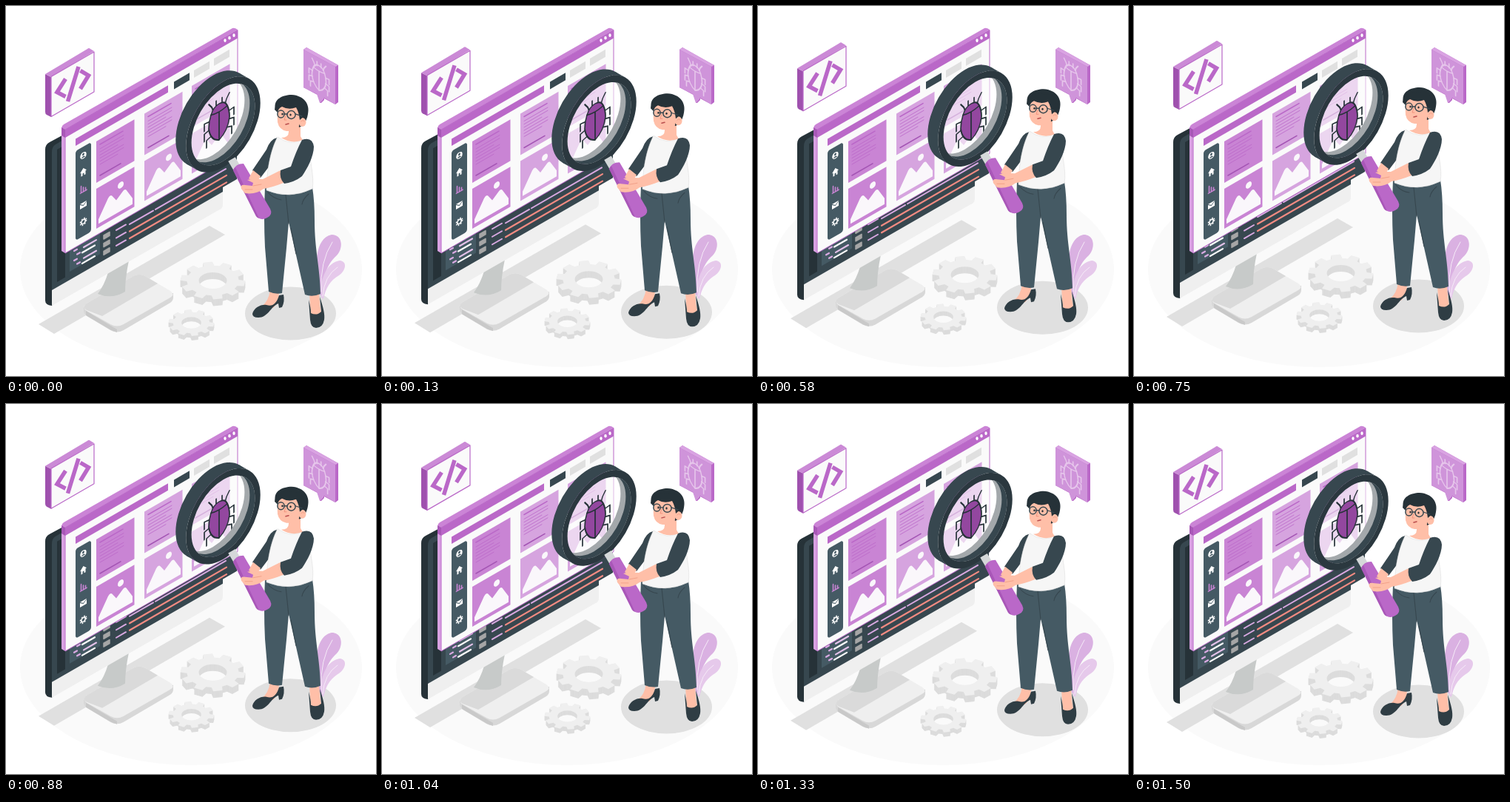
Animation, 500 px wide and 500 px high, one loop 1.54 s. Source, as an HTML page:

```html
<!DOCTYPE html>
<html lang="en">
<head>
<meta charset="utf-8">
<title>Bug hunt</title>
<style>
html, body { margin: 0; width: 100%; height: 100%; overflow: hidden; background: #fff; }
svg { display: block; width: 100%; height: 100%; }
</style>
</head>
<body>
<svg id="stage" viewBox="0 0 500 500"></svg>
<script>
const PURPLE = '#ba68c8', LILAC = '#c984d4', PALE = '#d6a4df', INK = '#263238', SLATE = '#37474f', TEAL = '#455a64', SKIN = '#ffbfa8';
const SLOPE = 0.5774;

const path = (d, fill, more = '') => `<path d="${d}" fill="${fill}" ${more}/>`;
const stroke = (d, color, width = 1, more = '') =>
  path(d, 'none', `stroke="${color}" stroke-width="${width}" stroke-linecap="round" stroke-linejoin="round" ${more}`);
const ellipse = (cx, cy, rx, ry, fill, more = '') =>
  `<ellipse cx="${cx}" cy="${cy}" rx="${rx}" ry="${ry}" fill="${fill}" ${more}/>`;

// Isometric helpers: a panel, a line, a skewed group and a circle
const panel = (x, y, w, h, fill, more) => path(`M${x} ${y}l${w} ${-w * SLOPE}v${h}l${-w} ${w * SLOPE}z`, fill, more);
const line = (x, y, w, color, width) => stroke(`M${x} ${y}l${w} ${-w * SLOPE}`, color, width);
const skew = (x, y, content, slope = -SLOPE, size = 1) =>
  `<g transform="matrix(1 ${slope} 0 1 ${x} ${y}) scale(${size})">${content}</g>`;
const ring = (cx, cy, r) => {
  const dx = 0.612 * r, dy = -1.061 * r, arc = `${1.2247 * r} ${0.7071 * r} -60 0 1`;
  return `M${cx - dx} ${cy - dy}a${arc} ${2 * dx} ${2 * dy}a${arc} ${-2 * dx} ${-2 * dy}z`;
};

function gear(cx, cy, r, teeth, height) {
  const points = [], step = 2 * Math.PI / teeth;
  for (let i = 0; i < teeth; i++)
    for (const [offset, scale] of [[-0.33, 0.8], [-0.23, 1], [0.23, 1], [0.33, 0.8]]) {
      const a = (i + offset + 0.25) * step;
      points.push(`${cx + r * scale * Math.cos(a)} ${cy + r * scale * Math.sin(a) * SLOPE}`);
    }
  const h = r * 0.43, v = h * SLOPE;
  const d = `M${points.join('L')}zM${cx - h} ${cy}a${h} ${v} 0 0 1 ${2 * h} 0a${h} ${v} 0 0 1 ${-2 * h} 0z`;
  let out = '';
  for (let z = height; z >= 0; z--)
    out += path(d, z ? '#dcdcdc' : '#efefef', `fill-rule="evenodd" transform="translate(0 ${z})"`);
  return out;
}

function monitor() {
  let s = path('M53 194Q53 187 59 184L85 170V380L62 405Q53 404 53 398z', INK)
    + path('M62 197Q62 190 67 187L293 57V252L62 385z', SLATE)
    + panel(69, 194, 224, 179, INK)
    + path('M62 384L293 251V268Q293 274 287 276L62 405z', '#efefef')
    + panel(80, 240, 232, 128, SLATE)
    + panel(86, 300, 41, 59, TEAL);
  for (let i = 0; i < 3; i++)
    s += panel(132, 310 + i * 10.7, 8, 5, '#a6a6a6', 'stroke="#a6a6a6" stroke-width="1.5" stroke-linejoin="round"')
      + line(149, 303 + i * 10.5, 13, '#d9a9e2', 2);
  for (let i = 0; i < 4; i++)
    s += line(92 + i % 2 * 4, 331 + i * 6.5 - i % 2 * 2, 4, '#d9a9e2', 2.2)
      + line(105 - i % 2 * 2, 326 + i * 7.3, 17, i % 2 ? '#fff' : '#e3c1e9', 2.2);
  return s + line(167, 295, 32, '#d9a9e2', 2) + line(202, 275, 95, '#d9a9e2', 2)
    + line(167, 304.5, 131, '#f28b82', 2.2) + line(167, 314, 131, '#f28b82', 2.2);
}

const stand = () =>
  path('M105 407V413Q106 417 111 420L141 438Q150 443 159 438L222 401Q226 398 226 394V388z', '#d8d8d8')
  + path('M109 402L172 365Q180 361 188 365L222 385Q229 390 222 394L159 430Q150 435 141 430L109 412Q102 407 109 402z', '#efefef')
  + path('M109 402L172 365Q180 361 188 365L205 375L130 419L109 411Q102 407 109 402z', '#dadada')
  + path('M138 360L166 344Q161 368 161 386Q143 397 124 389Q133 377 138 360z', '#c7cac9')
  + path('M108 412L150 437V441L142 438L108 418z', '#c9c9c9');

const badge = () =>
  path('M53 92L61 96V150L55 147Q53 146 53 143z', '#9f51ae')
  + path('M53 92L110 58Q112 56 114 58L119 61L61 96z', '#cb8ad6')
  + panel(61, 95.5, 58, 54, '#fafafa', `stroke="${PURPLE}" stroke-width="1.2" stroke-linejoin="round"`)
  + path('M80.500 98.500L69 116.500L80.500 122.500M100.500 87.500L111.500 94L100.500 112M98 82L83.500 129', 'none',
    `stroke="${PURPLE}" stroke-width="5.5" stroke-miterlimit="8"`);

const picture = (x, y, fill) => panel(x, y, 51.5, 54, fill)
  + skew(x, y, path('M3 49V43L16 22Q19 18 22 23L27 31L36 24Q39 22 41 26L49 41V49z', '#faf7fb') + ellipse(33, 14, 4, 4.3, '#faf7fb'));

function article(x, y, fill) {
  let s = panel(x, y, 51.5, 56, fill) + line(x + 5, y + 4, 31, PURPLE, 1.6);
  for (let i = 0; i < 6; i++) s += line(x + 5, y + 10 + i * 4.2, i % 3 == 2 ? 24 : 32, PURPLE, 0.8);
  return s + line(x + 5, y + 46, 28, '#a455b4', 1.5);
}

function browser() {
  const icons =
    ellipse(10.5, 15, 4.2, 4.4, '#fff') + ellipse(10.5, 13.5, 1.5, 1.6, TEAL) + path('M7.700 18Q10.500 13.500 13.300 18z', TEAL)
    + path('M10.500 32L15 37H13.500V42H11.500V39H9.500V42H7.500V37H6z', '#fff')
    + stroke('M7.500 55V63M10.500 58V63M13.500 60V63M6.500 64H15', LILAC, 1.6)
    + path('M6 78.500H15V85.500H6z', '#fff') + stroke('M6 79L10.500 82.500L15 79', TEAL, 0.9)
    + ellipse(10.5, 104.5, 2.7, 2.8, 'none', 'stroke="#fff" stroke-width="1.6"')
    + ellipse(10.5, 104.5, 4.2, 4.4, 'none', 'stroke="#fff" stroke-width="1.4" stroke-dasharray="1.7 1.7"');
  return path('M75 165Q75 162 78 160L306 30Q309 29 313 32L80 168z', '#cb84d6')
    + path('M75 164L80 167V334L75 331z', '#d8a0e1')
    + panel(80, 167, 233, 167, '#fafafa', `stroke="${PURPLE}"`)
    + panel(80, 167, 233, 11, PURPLE) + path('M75 164L80 167V178L75 175z', '#a858b7')
    + [296, 302, 308].map(x => ellipse(x, 217.5 - x * SLOPE, 1.7, 2.3, '#fff')).join('')
    + panel(94, 179.5, 125, 9.5, PURPLE)
    + panel(227, 102.5, 21, 10, SLATE) + panel(254, 87, 21, 10, '#e0e0e0') + panel(281, 71, 21, 10, '#e0e0e0')
    + skew(94, 196, `<rect width="21" height="121" rx="3.500" fill="${TEAL}"/>`) + skew(94, 193, icons)
    + article(122, 183, LILAC) + article(187, 145.5, PALE) + article(251, 108, PALE)
    + picture(122, 247, LILAC) + picture(187, 209.5, PALE) + picture(251, 172.5, PALE);
}

// A symmetric beetle around the origin, seen flat from above
function beetle(color, width, fill) {
  const half = stroke('M13 -7L20 -8V2M13 4L20 6V16M11 14L17 16V26M8 -19L10 -25L14 -31M4 -22V-30', color, width);
  return half + `<g transform="scale(-1 1)">${half}</g>`
    + path('M0 -24Q8 -24 11 -15Q14 -8 14 2Q12 19 0 25Q-12 19 -14 2Q-14 -8 -11 -15Q-8 -24 0 -24z', fill, `stroke="${color}" stroke-width="${width}"`)
    + stroke('M-11 -15Q0 -11 11 -15M0 -13V25', color, width);
}

const bubble = () =>
  path('M402 59L406 56L449 80V130L445 133L402 110z', PURPLE)
  + path('M402 59L406 56L449 80L445 82z', '#d9a3e2')
  + path('M402 59L445 82V133L430 124L424 131L420 119L402 110z', '#cf94da')
  + path('M424 131L430 124V127L426 131z', PURPLE)
  + skew(423, 97, beetle('#e6c6eb', 2.4, 'none'), SLOPE, 0.68);

const plant = () =>
  path('M424 390C416 352 417 314 440 309C456 309 456 329 446 338C436 347 428 362 427 392z', '#dab1e2')
  + path('M426 394C424 366 434 347 451 344C462 345 459 358 450 364C438 371 432 381 429 396z', '#e6c9eb')
  + stroke('M426 386Q424 345 441 319M428 392Q430 365 448 353', '#f6ebf8', 1);

const CX = 293.5, CY = 160;
const glass = () => path(ring(CX - 6, CY - 3, 48), '#fff', 'opacity=".55"');

function magnifier() {
  const outer = ring(CX, CY, 58), inner = ring(CX, CY, 49.5), all = 'M200 50H400V260H200z';
  const opening = ring(CX - 14, CY - 8, 49.5), odd = 'fill-rule="evenodd"';
  return `<clipPath id="rim">${path(inner, '#000')}</clipPath>`
    + `<clipPath id="back"><path clip-rule="evenodd" d="${all}${outer}"/></clipPath>`
    + `<g clip-path="url(#back)">${path(ring(CX - 14, CY - 8, 58), SLATE)}`
    + path(`M${CX - 35.5} ${CY + 61.5}l-14 -8L${CX + 21.5} ${CY - 69.5}l14 8z`, SLATE) + '</g>'
    + `<g clip-path="url(#rim)">${path(all + opening, '#a3a8ab', odd)}${path(all + ring(CX - 7, CY - 4, 49.5), SLATE, odd)}</g>`
    + path(outer + inner, '#2b383f', odd)
    + stroke('M305 207L315 224', '#d5d8d9', 11, 'style="stroke-linecap:butt"')
    + path('M307 222Q310 213 321 213L357 274Q361 282 353 286Q345 291 338 284z', PURPLE)
    + path('M307 222Q308 219 310 218L342 287Q339 286 338 284z', '#a957b8');
}

const legs = () =>
  path('M357 383L369 386Q369 401 361 408L345 406Q355 400 357 383zM410 388L423 386Q424 408 427 418L412 419z', SKIN)
  + path('M333 416C335 408 344 403 352 404Q364 408 369 391L375 390Q377 399 373 407L369 408L368 402C357 407 354 421 341 421Q333 421 333 416z', '#2f3d44')
  + path('M409 397Q412 408 412 415Q420 419 426 413L424 393C429 408 431 417 430 424Q428 435 419 435Q412 435 411 424z', '#2f3d44')
  + path('M350 246Q348 285 350 326L355 386Q364 390 373 388L379 327L382 292L404 390Q414 394 425 389C424 350 417 330 417 290Q417 264 414 245z', TEAL)
  + stroke('M378 255Q380 275 382 294M409 254Q401 261 400 268M354 252Q362 261 372 262M385 300L392 335', SLATE, 1.1);

const body = () =>
  path('M366 178Q357 180 352 194L333 222L344 232L360 211z', SLATE)
  + path('M367 177C357 195 352 225 352 249Q383 262 414 247C417 229 410 211 411 196L402 180Q385 190 367 177z', '#f6f6f6', 'stroke="#dedede" stroke-width=".6"')
  + path('M382 163L398 160V176Q400 180 401 181Q386 187 372 178Q382 178 382 170z', SKIN)
  + path('M334 222L344 230L338 240L328 233z', SKIN)
  + path('M371 222L375 239Q360 245 348 247Q338 255 323 253L318 247Q316 241 323 242L333 243L334 239L326 235Q334 233 347 234z', SKIN)
  + stroke('M334 243L345 241M323 248L333 248', '#ee9a82', 0.8)
  + path('M400 181Q414 176 416 190C416 203 407 220 400 230Q390 238 376 240Q369 233 371 222L385 217Q392 196 400 181z', SLATE);

const head = () =>
  path('M364 139C361 126 374 120 386 120C403 121 411 133 408 146Q407 153 402 161L396 164L391 135z', INK)
  + path('M369 135Q366 148 367 157Q369 167 379 169Q389 170 396 162L398 148L394 134z', SKIN)
  + ellipse(400.5, 157, 5, 6, SKIN) + stroke('M399 156Q402 153 403 156', '#ee9a82', 0.8)
  + path('M363 140Q364 129 377 126L398 128L406 146L397 154Q396 144 392 137Q382 141 373 136Q368 138 367 144z', INK)
  + ellipse(371.5, 146, 4.6, 5, 'none', `stroke="${SLATE}" stroke-width="1.5"`)
  + ellipse(385.5, 147, 5.6, 5.4, 'none', `stroke="${SLATE}" stroke-width="1.5"`)
  + stroke('M376 146L380 146M391 146L400 149', SLATE, 1.3)
  + ellipse(373.5, 146, 1.2, 1.6, INK) + ellipse(384.5, 147, 1.2, 1.6, INK)
  + stroke('M378 148L376 154L379 154', '#ee8f7a', 0.9) + stroke('M378 160L382 159', '#b94d4d', 1.5);

const floating = content => `<g class="float">${content}</g>`;
const stage = document.getElementById('stage');
stage.innerHTML = ellipse(250, 356, 231, 132, '#fafafa')
  + floating(path('M44 430L275 297L296 309L65 443z', '#e0e0e0') + ellipse(384.5, 415.5, 61.5, 36, '#e0e0e0')
    + stand() + monitor() + gear(279.5, 371, 44, 10, 9) + gear(250.5, 428, 31, 10, 6) + badge())
  + browser() + bubble() + plant()
  + floating(glass()) + skew(288, 156, beetle(INK, 1.7, '#93479f'))
  + floating(legs() + magnifier() + body() + head());

const floats = stage.querySelectorAll('.float');
function draw(now) {
  const phase = Math.min(now % 1540 / 1500, 1);
  const y = -10 * (1 - Math.abs(1 - 2 * phase));
  floats.forEach(g => g.setAttribute('transform', `translate(0 ${y})`));
  requestAnimationFrame(draw);
}
draw(0);
</script>
</body>
</html>
```
